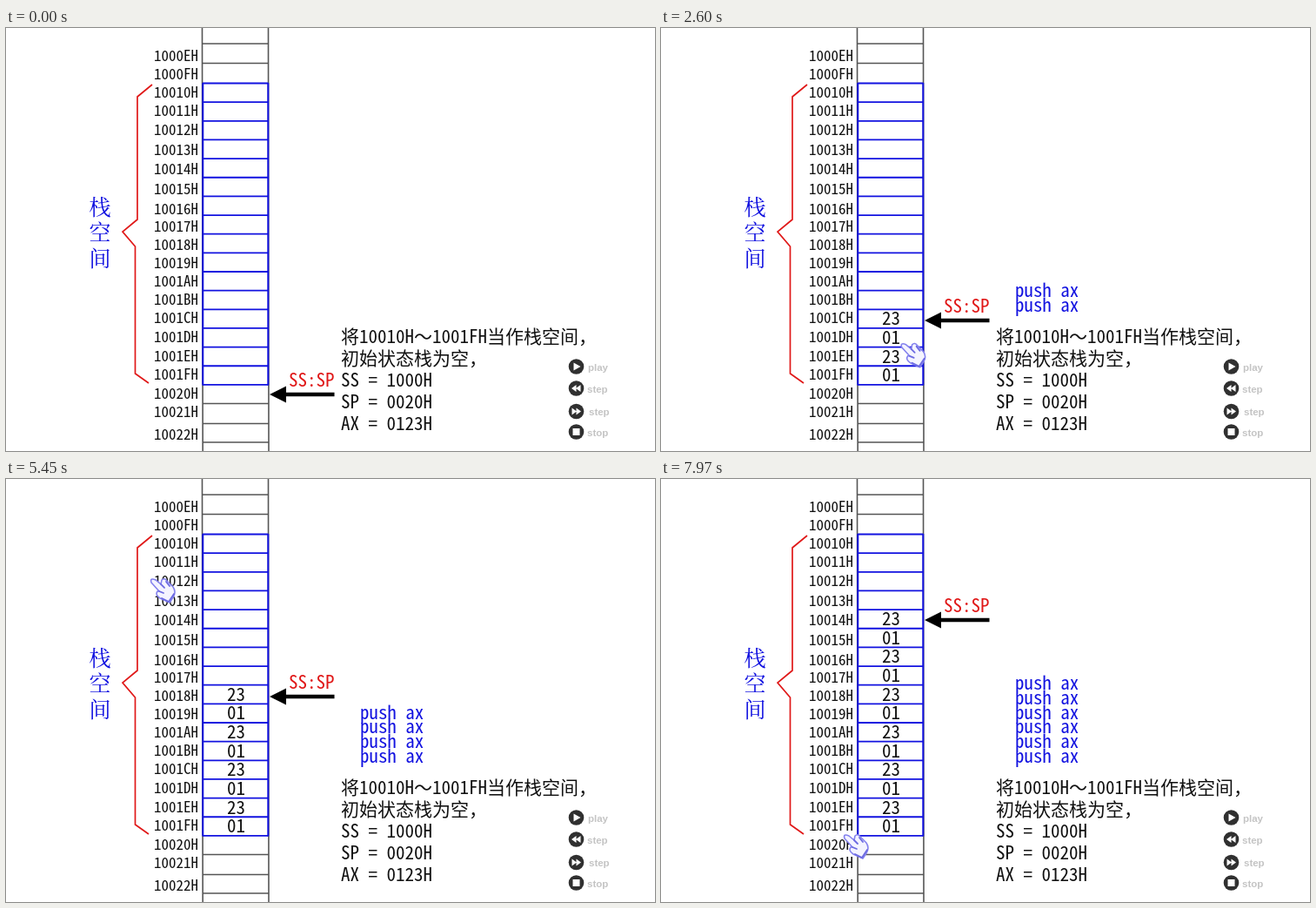
Animation of 746 by 486 pixels, one loop 8000 ms. Source, as an HTML page:

```html
<!DOCTYPE html>
<html lang="zh">
<head>
<meta charset="utf-8">
<title>栈空间 push ax</title>
<style>
  html, body { margin: 0; width: 100%; height: 100%; overflow: hidden; background: #fff; }
  svg { display: block; width: 746px; height: 486px; }
  text { white-space: pre; }
  .code { font-family: "Noto Sans Mono CJK SC", "Liberation Mono", monospace; }
  .title { font: 25px "Noto Serif CJK SC", "Noto Sans CJK SC", serif; }
  .button { font: bold 11.5px "Liberation Sans", sans-serif; }
</style>
</head>
<body>
<svg id="stage" viewBox="0 0 746 486"></svg>
<script>
const LOOP = 8000;
const BLUE = '#1212e0', RED = '#e01818', INK = '#111';
const stage = document.getElementById('stage');

function add(tag, attrs, parent = stage) {
  const el = document.createElementNS('http://www.w3.org/2000/svg', tag);
  for (const key in attrs) el.setAttribute(key, attrs[key]);
  parent.appendChild(el);
  return el;
}

// Font size that gives the wanted advance per half-width character.
const ruler = document.createElement('canvas').getContext('2d');
ruler.font = '100px "Noto Sans Mono CJK SC", "Liberation Mono", monospace';
const perEm = ruler.measureText('0').width / 100;

function write(str, x, y, advance, fill, parent) {
  const el = add('text', { x, y, fill, class: 'code', 'font-size': advance / perEm }, parent);
  el.textContent = str;
  return el;
}

function line(d, stroke, width) {
  return add('path', { d, stroke, 'stroke-width': width, fill: 'none' });
}

// Memory column
const rowLine = i => 63.5 + i * 21.65;
line('M225.5 0L226.2 486M301.5 0L302 486', '#555', 1.6);
for (const y of [18, 40.5, 431.5, 454.5, 476]) line(`M226 ${y}H302`, '#555', 1.5);
for (let i = 0; i <= 16; i++) line(`M226 ${rowLine(i)}H301.5`, BLUE, 1.8);
line(`M226.3 63V410.5M301.3 63V410.5`, BLUE, 2);

const labelY = [32, 53, 74, 95, 117, 140, 162, 185, 208, 228, 249,
  270, 291, 312, 333, 355, 377, 398, 420, 441, 467];
labelY.forEach((y, i) => {
  const address = (0x1000E + i).toString(16).toUpperCase() + 'H';
  write(address, 170, y + 5.5, 8.5, INK);
});

line('M168 65L151 79V220L134 234L148.500 251V397L164 408', RED, 1.7);
[...'栈空间'].forEach((ch, i) => {
  add('text', { x: 95.5, y: 215 + i * 29.3, fill: BLUE, class: 'title' }).textContent = ch;
});

['将10010H～1001FH当作栈空间，', '初始状态栈为空，', 'SS = 1000H', 'SP = 0020H', 'AX = 0123H']
  .forEach((str, i) => write(str, 385, 362 + i * 25, 10.5, INK));

// Player buttons
[
  ['play', 389, 669, 'M-3 -4.500L5 0L-3 4.500Z'],
  ['step', 414, 668, 'M0 -4V4L-5.500 0ZM5 -4V4L-.5 0Z'],
  ['step', 440.5, 670, 'M0 -4V4L5.500 0ZM-5 -4V4L.5 0Z'],
  ['stop', 464, 668, 'M-4 -4H4V4H-4Z']
].forEach(([name, y, x, icon]) => {
  add('circle', { cx: 655.5, cy: y, r: 8.8, fill: '#303030' });
  add('path', { d: icon, fill: '#fff', transform: `translate(655.5 ${y})` });
  add('text', { x, y: y + 4.5, fill: '#c4c4c4', class: 'button' }).textContent = name;
});

// Stack pointer
const pointer = add('g', {});
add('path', { d: 'M303 0L322 -9.500V-2.300H377.500V2.300H322V9.500Z', fill: '#000' }, pointer);
write('SS:SP', 325, -9, 10.5, RED, pointer);
const pointerY = [421, 376, 336, 292, 250, 204, 162];

// One entry per push: instruction first, then the pointer, then the two bytes
const pushes = pointerY.slice(1).map((y, i) => {
  const start = 700 + i * 1290;
  const text = write('push ax', 407, 326 - i * 16.8, 10.45, BLUE);
  const bytes = add('g', {});
  ['23', '01'].forEach((value, k) => {
    write(value, 254, rowLine(14 - 2 * i + k) + 18, 10.5, INK, bytes);
  });
  return { text, bytes, start, move: start + 300, store: start + 550 };
});

// Hand cursor
const hand = add('g', {});
add('path', {
  d: 'M2 7Q0 1 7 4L13 9L14 4Q17 1 20 5L27 12Q31 18 27 24L23 30L12 25Q6 21 9 17L11 17Z',
  fill: '#f4f4ff', stroke: '#8482ee', 'stroke-width': 1.6, 'stroke-linejoin': 'round'
}, hand);
add('path', {
  d: 'M13 9L17 13M19 6L23 11M11 17L16 19M14 25L22 29L28 20',
  fill: 'none', stroke: '#6c6ae2', 'stroke-width': 1.8, 'stroke-linecap': 'round'
}, hand);

const path = [
  [650, 82, 400], [1000, 200, 455], [1420, 275, 452], [1900, 270, 452], [2300, 264, 440],
  [2600, 275, 360], [3050, 118, 276], [3450, 105, 180], [3860, 150, 85],
  [4150, 160, 70], [4390, 167, 92], [5000, 163, 85], [5450, 165, 112],
  [5900, 185, 95], [6310, 197, 72], [6800, 205, 85], [7200, 208, 240],
  [7550, 209, 415], [7970, 209, 406], [8000, 209, 406]
];

function handAt(t) {
  const i = Math.max(1, path.findIndex(p => p[0] >= t));
  const [t0, x0, y0] = path[i - 1], [t1, x1, y1] = path[i];
  const k = (t - t0) / (t1 - t0);
  return [x0 + (x1 - x0) * k, y0 + (y1 - y0) * k];
}

const show = (el, on) => el.setAttribute('visibility', on ? 'visible' : 'hidden');

function draw(t) {
  let moved = 0;
  for (const p of pushes) {
    show(p.text, t >= p.start);
    show(p.bytes, t >= p.store);
    if (t >= p.move) moved++;
  }
  pointer.setAttribute('transform', `translate(0 ${pointerY[moved]})`);
  show(hand, t >= path[0][0]);
  if (t >= path[0][0]) hand.setAttribute('transform', `translate(${handAt(t)})`);
}

const began = performance.now();
function tick() {
  draw((performance.now() - began) % LOOP);
  requestAnimationFrame(tick);
}
tick();
</script>
</body>
</html>
```
